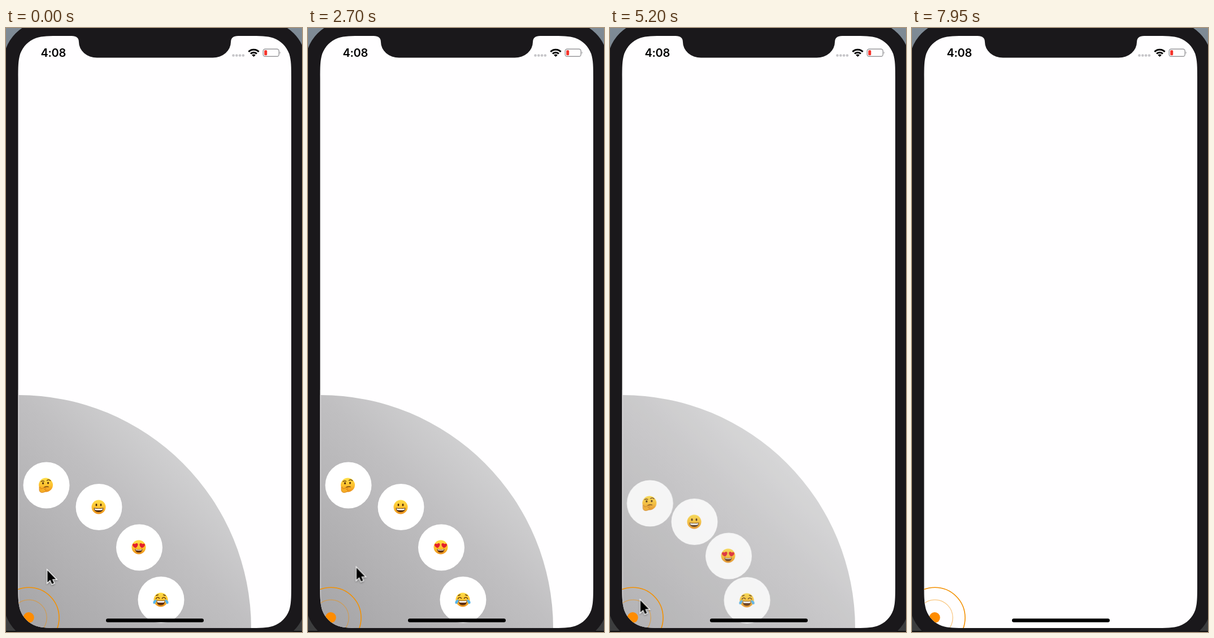
An HTML page for the animation above (8000 ms loop, 524 px wide and 1068 px high).

```html
<!DOCTYPE html>
<html lang="en">
<head>
<meta charset="utf-8">
<title>Corner emoji menu</title>
<style>
html, body { margin: 0; width: 100%; height: 100%; overflow: hidden; background: #59636b; }
svg { display: block; width: 524px; height: 1068px; }
text { font: 600 20px Inter, Roboto, sans-serif; letter-spacing: -.3px; }

.fan { --x: 0px; --y: 0px; animation: fan 8s infinite; }
.cursor { animation: move 8s infinite, hide 8s step-end infinite; }
.click { animation: click 8s step-end infinite; }
.button { animation: press 8s step-end infinite; }

@keyframes fan {
  0%, 11.36%, 31.25%, 43.64%, 66.25%, 83.75% {
    opacity: 1; transform: translate(0, 0); animation-timing-function: ease-in-out;
  }
  15.11%, 27.5%, 47.39%, 62.5%, 87.5%, 100% {
    opacity: 0; transform: translate(var(--x), var(--y)); animation-timing-function: ease-out;
  }
}
@keyframes move {
  0% { transform: translate(72px, 957px); animation-timing-function: ease-in-out; }
  10%, 15.5% { transform: translate(163px, 840px); animation-timing-function: ease-in-out; }
  24%, 28% { transform: translate(60px, 1014px); animation-timing-function: ease-in; }
  33.75% { transform: translate(84px, 953px); animation-timing-function: ease-out; }
  42%, 48.5% { transform: translate(285px, 690px); animation-timing-function: ease-in-out; }
  58.5%, 64% { transform: translate(51px, 1011px); animation-timing-function: ease-in; }
  74.375% { transform: translate(138px, 942px); animation-timing-function: ease-out; }
  82%, 100% { transform: translate(236px, 916px); }
}
@keyframes hide {
  0% { opacity: 1; }
  91.25%, 100% { opacity: 0; }
}
@keyframes click {
  0%, 11.25%, 27.5%, 43.5%, 62.5%, 83.75%, 100% { opacity: 0; }
  10%, 25.625%, 42.25%, 60.25%, 82.5% { opacity: 1; }
}
@keyframes press {
  0%, 27.5%, 62.5%, 100% { filter: none; }
  25.625%, 60.25% { filter: brightness(.52); }
}
</style>
</head>
<body>
<svg viewBox="0 0 524 1068">
  <defs>
    <linearGradient id="desk" x2="0" y2="1">
      <stop offset="0" stop-color="#7f8b96"/>
      <stop offset=".5" stop-color="#4a4d50"/>
      <stop offset="1" stop-color="#3c3d3e"/>
    </linearGradient>
    <linearGradient id="shade" gradientUnits="userSpaceOnUse" x1="22" y1="1061" x2="434" y2="649">
      <stop offset="0" stop-color="#a5a4a6"/>
      <stop offset=".5" stop-color="#c0bfc1"/>
      <stop offset=".75" stop-color="#d3d3d4"/>
    </linearGradient>
    <linearGradient id="skin" x2="0" y2="1">
      <stop offset="0" stop-color="#ffdd48"/>
      <stop offset=".55" stop-color="#fdc02e"/>
      <stop offset="1" stop-color="#ea8d1a"/>
    </linearGradient>
    <!-- screen outline with continuous-curvature corners -->
    <path id="outline" d="M97.900 14H428.600c22 0 33 0 44.800 3.700c13 4.800 23.100 14.900 27.900 27.900c3.700 11.800 3.700 22.800 3.700 44.800V984.600c0 22 0 33-3.700 44.800c-4.800 13-14.900 23.100-27.900 27.900c-11.800 3.700-22.800 3.700-44.800 3.700H97.900c-22 0-33 0-44.800-3.700c-13-4.800-23.100-14.900-27.900-27.900c-3.700-11.800-3.700-22.800-3.700-44.800V90.400c0-22 0-33 3.700-44.800c4.800-13 14.900-23.100 27.900-27.900c11.800-3.700 22.800-3.700 44.800-3.700Z"/>
    <clipPath id="screen"><use href="#outline"/></clipPath>
    <filter id="drop" x="-50%" y="-50%" width="200%" height="200%">
      <feDropShadow dx="0" dy="1.500" stdDeviation="1.600" flood-opacity=".4"/>
    </filter>
    <circle id="plate" r="41" fill="#fff"/>
    <circle id="face" r="12.500" fill="url(#skin)"/>
    <path id="heart" d="M0 4.600C-8 0-4.600-6.400 0-2.600C4.600-6.400 8 0 0 4.600Z" fill="#e3202c"/>
    <path id="tear" d="M-7.500-.5C-12 0-15 4-13 6.700C-10 9-7.500 4-7.500-.5Z" fill="#55b5ee"/>
  </defs>

  <rect width="524" height="1068" fill="url(#desk)"/>
  <rect y="1066" width="524" height="2" fill="#111"/>
  <use href="#outline" fill="#1a181b" stroke="#1a181b" stroke-width="54"/>

  <g clip-path="url(#screen)">
    <rect x="21" y="14" width="485" height="1048" fill="#fffeff"/>
    <circle class="fan" cx="22" cy="1061" r="412" fill="url(#shade)"/>
    <rect x="21.500" y="640" width="1" height="421" fill="#f1f0f2"/>

    <g class="fan" style="--x:-4.500px;--y:208.500px">
      <g transform="translate(71.500 808.500)">
        <use href="#plate"/>
        <g transform="translate(-1 -.5)">
          <use href="#face"/>
          <g fill="#4d2a0b">
            <ellipse cx="-5" cy="-3" rx="1.500" ry="2"/>
            <ellipse cx="4" cy="-3.500" rx="1.500" ry="2"/>
          </g>
          <path d="M-8.500-6Q-5.500-8-3-6.500M2-8Q5.500-10.500 8-7.500M-3 4.200Q1 2 4.500 3.300" fill="none" stroke="#5b320c" stroke-width="1.300" stroke-linecap="round"/>
          <path d="M-11.500 4Q-10.300 2.700-9.500 4.200L-8.500 7L-1 4.200Q1.500 4.200.3 6L-3 7.500Q1 8 0 10Q-1 13-6 13.500Q-11 13.500-11.500 9Z" fill="#f6ad27" stroke="#cf7c13" stroke-width=".8"/>
        </g>
      </g>
    </g>

    <g class="fan" style="--x:-97.500px;--y:170px">
      <g transform="translate(164.500 847)">
        <use href="#plate"/>
        <g transform="translate(-.5 0)">
          <use href="#face"/>
          <g fill="#4d2a0b">
            <ellipse cx="-4" cy="-3.700" rx="1.400" ry="2.200"/>
            <ellipse cx="4" cy="-3.700" rx="1.400" ry="2.200"/>
            <path d="M-8.500 1.500Q0 3 8.500 1.500Q8 9 0 9Q-8 9-8.500 1.500Z"/>
          </g>
          <path d="M-7.500 2.400Q0 3.700 7.500 2.400L6.500 5.200Q0 6.200-6.500 5.200Z" fill="#fff"/>
        </g>
      </g>
    </g>

    <g class="fan" style="--x:-169px;--y:98.500px">
      <g transform="translate(236 918.500)">
        <use href="#plate"/>
        <g transform="translate(-1 -.5)">
          <use href="#face"/>
          <use href="#heart" transform="translate(-6 -3) rotate(-8)"/>
          <use href="#heart" transform="translate(6 -3) rotate(8)"/>
          <path d="M-6.500 3.300Q0 5 6.500 3.300Q6 9.600 0 9.600Q-6 9.600-6.500 3.300Z" fill="#61300d"/>
          <path d="M-5.600 4.100Q0 5.300 5.600 4.100L5 5.600Q0 6.500-5 5.600Z" fill="#fff"/>
        </g>
      </g>
    </g>

    <g class="fan" style="--x:-207.500px;--y:6px">
      <g transform="translate(274.500 1011)">
        <use href="#plate"/>
        <g transform="translate(-.5 0)">
          <use href="#face"/>
          <path d="M-8.500-2Q-5.500-6.500-2.500-2.500M2.500-2.500Q5.500-6.500 8.500-2M-8-7.500L-4.500-8.800M8-7.500L4.500-8.800" fill="none" stroke="#5b320c" stroke-width="1.400" stroke-linecap="round"/>
          <path d="M-7.500 1Q0 2 7.500 1Q7.500 9.800 0 9.800Q-7.500 9.800-7.500 1Z" fill="#61300d"/>
          <path d="M-6.800 1.700Q0 2.700 6.800 1.700L6 4.700Q0 5.500-6 4.700Z" fill="#fff"/>
          <use href="#tear"/>
          <use href="#tear" transform="scale(-1 1)"/>
        </g>
      </g>
    </g>

    <g class="button" fill="none" stroke="#f39000">
      <circle cx="40.500" cy="1042.800" r="53.500" stroke-width="1.600"/>
      <circle cx="40.500" cy="1042.800" r="31.700" stroke-width="1.300" opacity=".5"/>
      <circle cx="40.200" cy="1042.500" r="9.500" fill="#ff8c00" stroke="none"/>
    </g>
    <rect x="177" y="1044.300" width="173" height="6.400" rx="3.200"/>
  </g>

  <path d="M116 13V14Q129 14 129 25A32 27.500 0 0 0 161 52.500H366A32 27.500 0 0 0 398 25Q398 14 411 14V13Z" fill="#1a181b"/>

  <text x="61.500" y="51">4:08</text>
  <g fill="#c6c5c9">
    <circle cx="402.500" cy="48.500" r="2.300"/>
    <circle cx="408.300" cy="48.500" r="2.300"/>
    <circle cx="414.100" cy="48.500" r="2.300"/>
    <circle cx="419.900" cy="48.500" r="2.300"/>
  </g>
  <g fill="none" stroke="#000" stroke-width="3">
    <path d="M429.400 42A12.800 12.800 0 0 1 447.600 42"/>
    <path d="M433 45.500A7.800 7.800 0 0 1 444 45.500"/>
    <path d="M435.200 47.800A4.700 4.700 0 0 1 441.800 47.800L438.500 51Z" fill="#000" stroke="none"/>
  </g>
  <rect x="455.200" y="37.200" width="28" height="13" rx="3.500" fill="none" stroke="#99989c" stroke-width="1.400"/>
  <path d="M484.600 41.500Q487 43.700 484.600 46Z" fill="#99989c"/>
  <rect x="457.200" y="39.200" width="5" height="9" rx="1.500" fill="#f5342b"/>

  <g class="cursor">
    <g class="click" fill="none">
      <circle cy="1" r="35.500" stroke="#fff" stroke-width="4.600" opacity=".75"/>
      <circle cy="1" r="35.500" stroke="#000" stroke-width="2.600"/>
    </g>
    <path d="M.8 1V25.500L6.400 20.300L10 28.600L14 26.900L10.500 18.800H18Z" transform="translate(.6 1) scale(.88)" stroke="#fff" stroke-width="3" paint-order="stroke" filter="url(#drop)"/>
  </g>
</svg>
</body>
</html>
```
